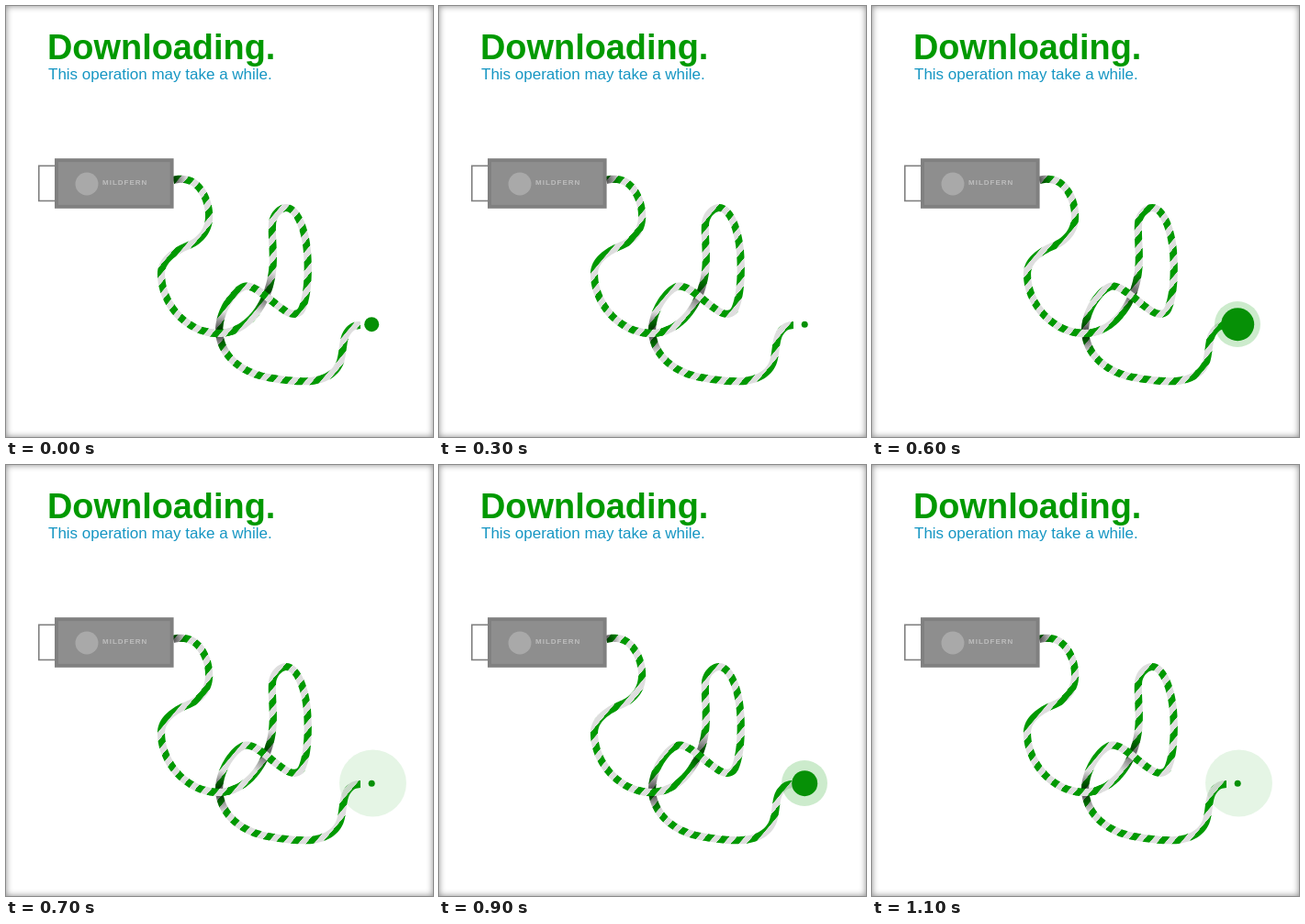
Write an HTML page that moves like this. It is 465 px wide and 470 px high and loops after 1.2 s.

```html
<!DOCTYPE html>
<html lang="en">
<head>
<meta charset="utf-8">
<title>Downloading</title>
<style>
  html, body { margin: 0; width: 100%; height: 100%; overflow: hidden; background: #fff; }
  svg { display: block; width: 465px; height: 470px; }
  .edge { position: fixed; inset: 0; box-shadow: inset 0 0 7px #888; pointer-events: none; }
  text { font-family: "Liberation Sans", Arial, sans-serif; }
</style>
</head>
<body>
<svg viewBox="0 0 465 470">
  <defs>
    <linearGradient id="stripes" gradientUnits="userSpaceOnUse" spreadMethod="repeat">
      <stop offset=".02" stop-color="#090"/><stop offset=".48" stop-color="#090"/>
      <stop offset=".52" stop-color="#dedede"/><stop offset=".98" stop-color="#dedede"/>
      <stop offset="1" stop-color="#6fbc6f"/>
    </linearGradient>
    <radialGradient id="plugShade" gradientUnits="userSpaceOnUse" cx="180" cy="190" r="17">
      <stop offset=".2" stop-opacity=".6"/><stop offset="1" stop-opacity="0"/>
    </radialGradient>
    <radialGradient id="riseShade" gradientUnits="userSpaceOnUse" cx="284" cy="313" r="24">
      <stop offset=".2" stop-opacity=".5"/><stop offset="1" stop-opacity="0"/>
    </radialGradient>
    <radialGradient id="fallShade" gradientUnits="userSpaceOnUse" cx="233" cy="356" r="23">
      <stop offset=".2" stop-opacity=".6"/><stop offset="1" stop-opacity="0"/>
    </radialGradient>
  </defs>

  <text x="45" y="58" font-size="37.9" font-weight="700" fill="#090">Downloading.</text>
  <text x="46" y="80" font-size="17" fill="#1696c3">This operation may take a while.</text>

  <g id="rope"></g>
  <circle id="halo" cy="347" fill="#090"/>
  <circle id="dot" cx="398.2" cy="347.2" fill="#069006"/>

  <rect x="35.8" y="174.3" width="18" height="38.2" fill="#fff" stroke="#808080" stroke-width="1.6"/>
  <rect x="55" y="168.2" width="125.6" height="50.6" fill="#8e8e8e" stroke="#808080" stroke-width="4"/>
  <circle cx="88" cy="194" r="12.5" fill="#a9a9a9"/>
  <text x="105" y="195.3" font-size="8" letter-spacing="1" font-weight="700" fill="#bdbdbd">MILDFERN</text>
</svg>
<div class="edge"></div>

<script>
const NS = "http://www.w3.org/2000/svg";
const byId = id => document.getElementById(id);

function setAttrs(node, attrs) {
  for (const name in attrs) node.setAttribute(name, attrs[name]);
  return node;
}

const spine = document.createElementNS(NS, "path");
spine.setAttribute("d", `M182 190 C188 188 198 188 205 193 C216 201 222 218 221 232
  C220 246 211 256 199 261 C182 268 169 278 169 292 C169 325 197 357 232 357
  C262 356 283 328 289 296 C293 275 289 255 290 238 C290 229 298 220 305 220
  C317 220 326 244 328 268 C330 293 328 318 322 331 C318 338 310 337 302 331
  C288 322 274 306 262 305.5 C251 306 232 330 232 355 C234 382 256 398 280 404
  C300 408 318 410 332 409 C350 407 360 399 364 388 C368 374 366 362 373 354
  C376 350 380 348 386 348`);

const LENGTH = spine.getTotalLength();
const HALF_WIDTH = 4.1;

// Point on the rope's edge; side is -1 or 1.
function edge(s, side) {
  const at = Math.min(s, LENGTH - 0.5);
  const a = spine.getPointAtLength(at), b = spine.getPointAtLength(at + 0.5);
  const p = spine.getPointAtLength(s);
  const k = side * HALF_WIDTH / Math.hypot(b.x - a.x, b.y - a.y);
  return (p.x - (b.y - a.y) * k).toFixed(2) + " " + (p.y + (b.x - a.x) * k).toFixed(2);
}

// Adds the stretch of rope from a to b, filled with the named gradient.
function addRope(a, b, fill) {
  const n = Math.ceil((b - a) / 2), left = [], right = [];
  for (let i = 0; i <= n; i++) {
    const s = a + (b - a) * i / n;
    left.push(edge(s, -1));
    right.unshift(edge(s, 1));
  }
  const d = "M" + left.concat(right).join("L") + "Z";
  byId("rope").append(setAttrs(document.createElementNS(NS, "path"), { d, fill: `url(#${fill})` }));
}

// Distance along the rope nearest to (x, y), at or after a given distance.
function locate(x, y, from = 0) {
  let best = from, least = Infinity;
  for (let s = from; s < LENGTH; s++) {
    const p = spine.getPointAtLength(s), gap = Math.hypot(p.x - x, p.y - y);
    if (gap < least) { least = gap; best = s; }
  }
  return best;
}

const bottom = locate(199, 349);
const rise = locate(284, 314, bottom);
const loop = locate(302, 331, rise + 150);
const fall = locate(232, 355, loop + 50);
const over = locate(284, 317, loop - 10);

addRope(0, LENGTH, "stripes");
addRope(0, 20, "plugShade");
addRope(rise - 26, rise + 26, "riseShade");
addRope(fall - 26, fall + 26, "fallShade");
// The strands that pass on top at the two crossings.
addRope(bottom + 18, bottom + 52, "stripes");
addRope(over - 14, over + 14, "stripes");

// Diagonal stripes, given by their period along x and along y.
const PERIOD_X = 17, PERIOD_Y = 20.2;
const scale = 1 / (PERIOD_X ** -2 + PERIOD_Y ** -2);
setAttrs(byId("stripes"), {
  x1: 178.5, y1: 190,
  x2: 178.5 + scale / PERIOD_X, y2: 190 + scale / PERIOD_Y
});

const PULSE = [
  { dot: 8, halo: 0, x: 398, alpha: 0 },
  { dot: 14, halo: 25, x: 398, alpha: 0.2 },
  { dot: 18, halo: 25, x: 398, alpha: 0.2 },
  { dot: 3.5, halo: 36.5, x: 399.5, alpha: 0.1 }
];

function draw(step) {
  const phase = step % 4, pulse = PULSE[phase];
  setAttrs(byId("stripes"), { gradientTransform: `translate(${PERIOD_X * phase / 4} 0)` });
  setAttrs(byId("dot"), { r: pulse.dot });
  setAttrs(byId("halo"), {
    cx: pulse.x,
    r: step === 3 ? 0 : pulse.halo, // the first pulse has no wide ring
    "fill-opacity": pulse.alpha
  });
}

const start = performance.now();
let shown = -1;
function tick() {
  const step = Math.floor((performance.now() - start) / 100) % 12;
  if (step !== shown) draw(shown = step);
  requestAnimationFrame(tick);
}
tick();
</script>
</body>
</html>
```
